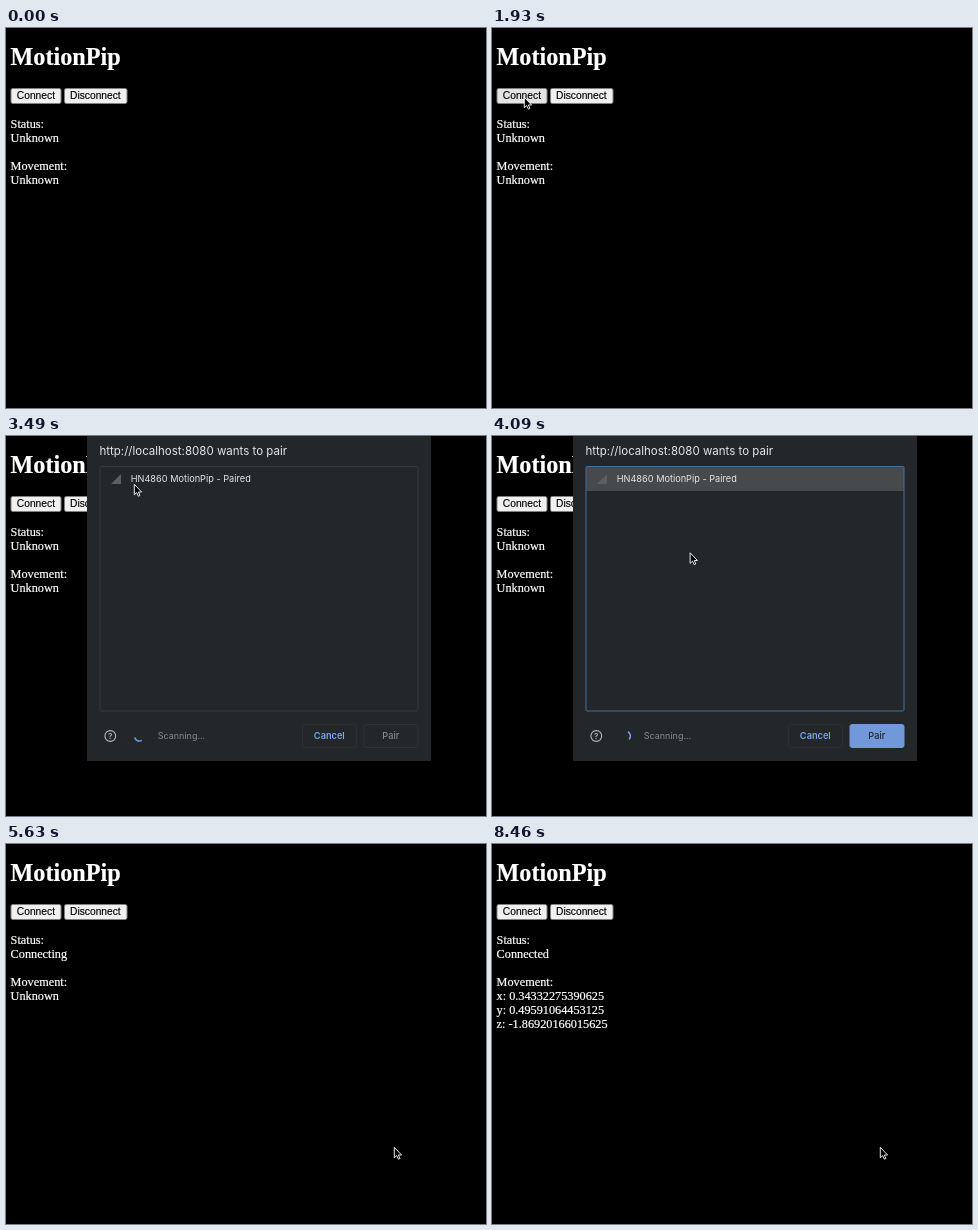
These frames come from a looping animation (480 by 380 pixels, 8.49 s). An HTML page:

```html
<!DOCTYPE html>
<html lang="en">
<head>
<meta charset="utf-8">
<title>MotionPip</title>
<style>
  html, body { margin: 0; width: 100%; height: 100%; overflow: hidden; background: #000; }
  svg { display: block; width: 480px; height: 380px; cursor: default; }
  .page { font: 12.25px "Liberation Serif", Times, serif; fill: #fff; }
  .page > text { stroke: #fff; stroke-width: .22px; }
  .page .title { font-size: 24.2px; font-weight: bold; }
  .btn rect { fill: #f0f0f0; stroke: #808080; }
  .btn text { font: 10.25px "Liberation Sans", Arial, sans-serif; fill: #000; stroke: #000; stroke-width: .15px; }
  .btn.hover rect { fill: #e4e4e4; }
  .dialog { font: 9px Inter, Roboto, sans-serif; fill: #e3e5e8; }
  .dialog .head { font-size: 11.5px; }
  .frame { fill: none; stroke: #36393b; }
  .list.active .frame { stroke: #40709f; }
  .row { fill: none; }
  .list.active .row { fill: #48494b; }
  .signal { fill: #5c5f62; }
  .ghost { fill: none; stroke: #2c2f31; }
  .action { font-size: 9.2px; font-weight: 500; text-anchor: middle; }
  .pair rect { fill: none; stroke: #2f3234; }
  .pair text { fill: #85898c; }
  .pair.ready rect { fill: #7198d8; stroke: #7198d8; }
  .pair.ready text { fill: #22262c; }
</style>
</head>
<body>
<svg viewBox="0 0 480 380" xmlns="http://www.w3.org/2000/svg">
  <rect width="480" height="380"/>
  <g class="page">
    <text class="title" x="4.5" y="37">MotionPip</text>
    <g class="btn" id="connect">
      <rect x="5" y="60.5" width="50" height="15" rx="1.8"/>
      <text x="10.8" y="71.4">Connect</text>
    </g>
    <g class="btn">
      <rect x="58.5" y="60.5" width="62.5" height="15" rx="1.8"/>
      <text x="64" y="71.4">Disconnect</text>
    </g>
    <text x="4.6" y="100.4">Status:</text>
    <text x="4.6" y="114.3" id="status"></text>
    <text x="4.6" y="142">Movement:</text>
    <text x="4.6" y="155.8" id="move0"></text>
    <text x="4.6" y="169.7" id="move1"></text>
    <text x="4.6" y="183.5" id="move2"></text>
  </g>

  <g class="dialog" id="dialog">
    <rect x="81" y="0" width="344" height="325" fill="#242729"/>
    <text class="head" x="93.5" y="19.3">http://localhost:8080 wants to pair</text>
    <g class="list" id="list">
      <rect class="row" x="94" y="31" width="318" height="24"/>
      <rect class="frame" x="94" y="30.5" width="318" height="244.5" rx="1"/>
      <path class="signal" d="M105 48L115 38V48Z"/>
      <text x="124.7" y="46.3" font-size="9.2">HN4860 MotionPip - Paired</text>
    </g>
    <circle cx="104.3" cy="300" r="5.4" fill="none" stroke="#b4b8bc" stroke-width="1.1"/>
    <text x="104.3" y="303" font-size="8" font-weight="600" text-anchor="middle" fill="#b4b8bc">?</text>
    <path id="spinner" fill="none" stroke="#719bea" stroke-width="1.6"/>
    <text x="151.7" y="303.4" fill="#85898d">Scanning...</text>
    <rect class="ghost" x="296.5" y="288.5" width="54" height="23" rx="2"/>
    <text class="action" x="323.3" y="303.4" fill="#7ba4ee" style="font-weight:600">Cancel</text>
    <g class="pair" id="pair">
      <rect x="358" y="288.5" width="54" height="23" rx="2"/>
      <text class="action" x="384.8" y="303.4">Pair</text>
    </g>
  </g>

  <path id="cursor" d="M.3 .3V10.8L2.7 8.6L4.4 12.2L5.9 11.5L4.4 8H7.6Z"
        fill="#000" stroke="#fff" stroke-width=".9" stroke-linejoin="round"/>
</svg>
<script>
const LOOP = 8490;
const AT = {
  cursor: 60, hover: 1280, open: 2150, list: 2800, leave: 2880,
  select: 3720, close: 4950, connected: 7350, data: 7600
};
const GYRO = [45, 65, -245];          // raw readings, 500 deg/s over 16 bits
const PATH = [                        // time, x, y
  [60, 396, 188], [400, 208, 190], [800, 55, 168], [890, 48, 140],
  [1150, 36, 98], [1350, 32, 69], [2800, 32, 69], [3350, 128, 48],
  [3880, 128, 48], [4500, 388, 303]
];
const $ = id => document.getElementById(id);
const show = (el, on) => el.setAttribute("visibility", on ? "inherit" : "hidden");
const setText = (el, s) => { if (el.textContent !== s) el.textContent = s; };

// cubic-bezier(.4, 0, .2, 1)
function ease(p) {
  let lo = 0, hi = 1, u = p;
  for (let i = 0; i < 20; i++) {
    u = (lo + hi) / 2;
    const x = 1.2 * u * (1 - u) ** 2 + 0.6 * u * u * (1 - u) + u ** 3;
    if (x < p) lo = u; else hi = u;
  }
  return 3 * u * u * (1 - u) + u ** 3;
}

function cursorAt(t) {
  let i = 0;
  while (i < PATH.length - 1 && t >= PATH[i + 1][0]) i++;
  const a = PATH[i], b = PATH[i + 1];
  if (!b || t < a[0]) return [a[1], a[2]];
  let p = (t - a[0]) / (b[0] - a[0]);
  if (a[0] > 1300) p = p * p * (3 - 2 * p);
  return [a[1] + (b[1] - a[1]) * p, a[2] + (b[2] - a[2]) * p];
}

function spinnerArc(t) {
  const elapsed = t + 2110, step = elapsed / 666.5, n = Math.floor(step);
  let sweep = 270 * ease(step - n);
  if (n % 2 === 0) sweep = Math.min(sweep - 270, -5);
  else sweep = Math.max(sweep, 5);
  const start = 317 + 360 * elapsed / 1568 + 270 * Math.floor(n / 2);
  const point = deg => {
    const r = deg * Math.PI / 180;
    return (133.4 + 5 * Math.cos(r)).toFixed(2) + " " + (300 + 5 * Math.sin(r)).toFixed(2);
  };
  const large = Math.abs(sweep) > 180 ? 1 : 0;
  return `M${point(start)}A5 5 0 ${large} ${sweep > 0 ? 1 : 0} ${point(start + sweep)}`;
}

function draw(t) {
  const open = t >= AT.open && t < AT.close;
  const chosen = t >= AT.select;
  show($("dialog"), open);
  show($("list"), t >= AT.list);
  $("list").classList.toggle("active", chosen);
  $("pair").classList.toggle("ready", chosen);
  $("connect").classList.toggle("hover", t >= AT.hover && t < AT.leave);
  if (open) $("spinner").setAttribute("d", spinnerArc(t));

  setText($("status"), t >= AT.connected ? "Connected" : t >= AT.close ? "Connecting" : "Unknown");
  GYRO.forEach((raw, i) => {
    const idle = i ? "" : "Unknown";
    setText($("move" + i), t >= AT.data ? "xyz"[i] + ": " + raw * 500 / 65536 : idle);
  });

  show($("cursor"), t >= AT.cursor);
  $("cursor").setAttribute("transform", `translate(${cursorAt(t).join(" ")})`);
}

const begin = performance.now();
function tick() {
  draw((performance.now() - begin) % LOOP);
  requestAnimationFrame(tick);
}
draw(0);
requestAnimationFrame(tick);
</script>
</body>
</html>
```
